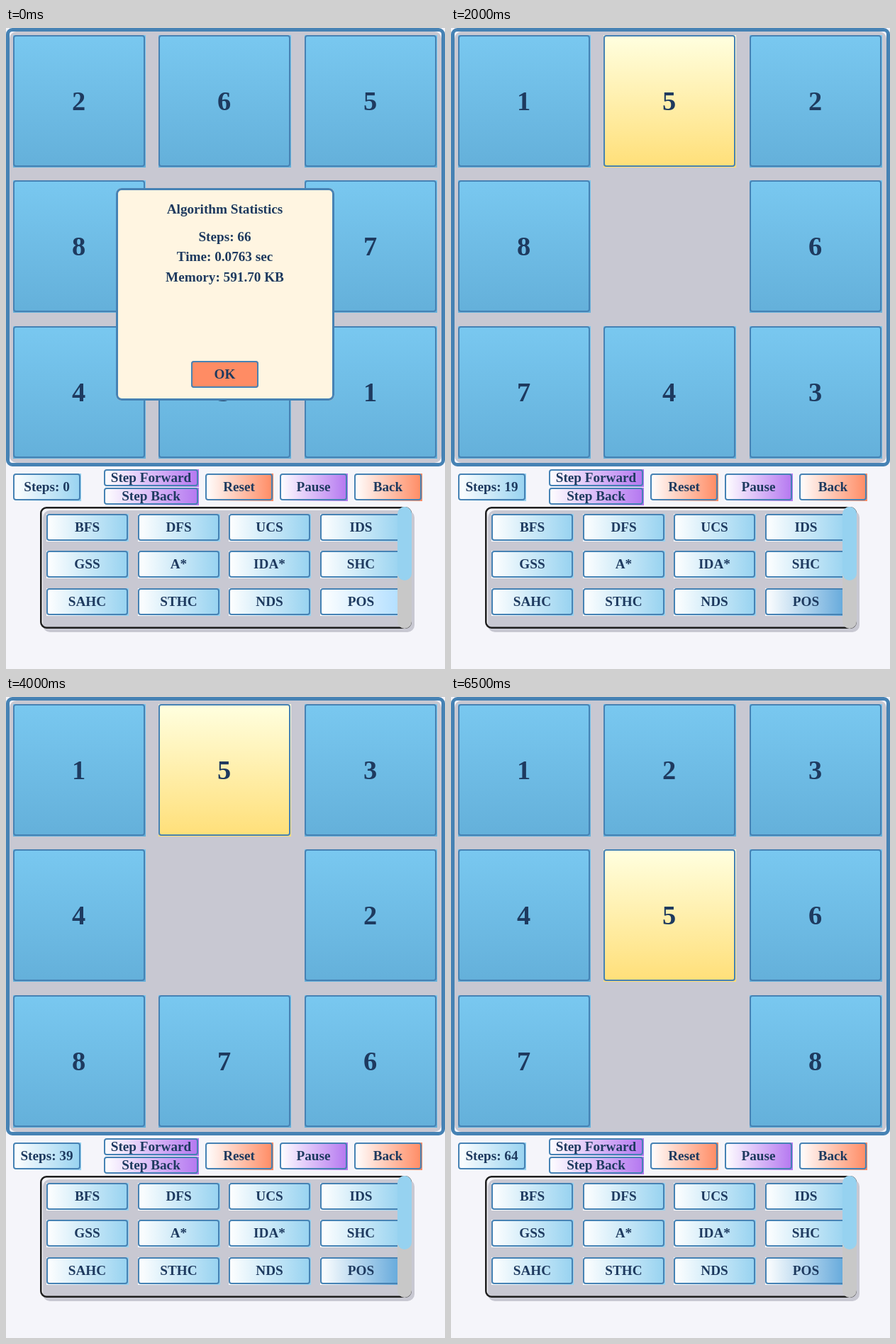
Recreate the animation shown at these times as an HTML page. Size 619 by 905 pixels, loop 6.6 s.

```html
<!DOCTYPE html>
<html lang="en">
<head>
<meta charset="utf-8">
<title>Sliding puzzle solver</title>
<style>
  html, body { margin: 0; width: 100%; height: 100%; overflow: hidden; background: #f5f5fa; }
  svg { display: block; }
  text {
    font: bold 19.2px "Liberation Serif", "Times New Roman", serif;
    fill: #1e3a5f; text-anchor: middle; white-space: pre;
  }
  .digit { font-size: 38.4px; }
</style>
</head>
<body>
<svg id="stage" width="619" height="905" viewBox="0 0 619 905">
  <defs>
    <clipPath id="list"><rect x="48" y="677" width="504" height="171"/></clipPath>
  </defs>
</svg>
<script>
const STEP = 100;
const START = "265807431";
// Cell of the gap after every move, cells numbered 0-8 by row.
const PATH = "45210345874" + "5214763014" + "76341258" + "745214785214" +
  "7634587634" + "763410367430147";
const EDGE = "#4682b4", GREY = "#c8c8d2";

const stage = document.getElementById("stage");
const defs = stage.querySelector("defs");

function add(parent, tag, attrs, content) {
  const el = document.createElementNS("http://www.w3.org/2000/svg", tag);
  for (const key in attrs) el.setAttribute(key, attrs[key]);
  if (content !== undefined) el.textContent = content;
  parent.appendChild(el);
  return el;
}

function gradient(id, from, to, vertical) {
  const g = add(defs, "linearGradient", { id, x2: vertical ? 0 : 1, y2: vertical ? 1 : 0 });
  add(g, "stop", { offset: 0, "stop-color": from });
  add(g, "stop", { offset: 1, "stop-color": to });
}

function box(parent, x, y, width, height, fill, rx = 0) {
  return add(parent, "rect", { x, y, width, height, fill, rx });
}

// Rounded outline drawn inside the given bounds.
function outline(parent, x, y, w, h, color, line, r) {
  const el = box(parent, x + line / 2, y + line / 2, w - line, h - line, "none", r - line / 2);
  el.setAttribute("stroke", color);
  el.setAttribute("stroke-width", line);
}

function label(parent, x, y, content, size = 19.2) {
  return add(parent, "text", { x, y: Math.round(y + size * 0.3375) }, content);
}

// Square fill under a rounded outline.
function button(parent, x, y, w, h, paint, content) {
  const fill = box(parent, x, y, w + 1, h + 1, `url(#${paint})`);
  outline(parent, x, y, w, h, EDGE, 2, 4);
  const text = label(parent, x + w / 2, y + h / 2, content);
  return { fill, text };
}

gradient("tile", "#79c8f0", "#64b0da", true);
gradient("moved", "#ffffe0", "#ffdf78", true);
gradient("blue", "#ffffff", "#96d2f0");
gradient("hover", "#ffffff", "#b0deff");
gradient("active", "#ffffff", "#5fa6da");
gradient("purple", "#ffffff", "#b476f0");
gradient("orange", "#ffffff", "#ff8a62");

// Board
box(stage, 5, 5, 609, 609, GREY, 10);
outline(stage, 0, 0, 619, 619, EDGE, 5, 9);
const tiles = [...START].map((_, i) => {
  const x = Math.round(9.7 + 205.67 * (i % 3));
  const y = Math.round(9.7 + 205.67 * Math.floor(i / 3));
  const g = add(stage, "g", {});
  const fill = box(g, x, y, 187, 187, "url(#tile)");
  outline(g, x, y, 186, 186, EDGE, 2, 4);
  const text = label(g, x + 92.5, y + 93.5, "", 38.4);
  text.setAttribute("class", "digit");
  return { g, fill, text };
});

// Controls
const counter = button(stage, 10, 629, 95, 38, "blue", "Steps: 0").text;
button(stage, 138, 623, 133, 24, "purple", "Step Forward");
button(stage, 138, 649, 133, 24, "purple", "Step Back");
button(stage, 281, 629, 95, 38, "orange", "Reset");
button(stage, 386, 629, 95, 38, "purple", "Pause");
button(stage, 491, 629, 95, 38, "orange", "Back");

// Algorithm list
box(stage, 52, 681, 524, 172, GREY, 10);
outline(stage, 48, 676, 524, 172, "#1e1e1e", 2.5, 9);
const list = add(stage, "g", { "clip-path": "url(#list)" });
const names = "BFS DFS UCS IDS GSS A* IDA* SHC SAHC STHC NDS POS".split(" ");
const entries = names.map((name, i) =>
  button(list, Math.round(57 + 128.6 * (i % 4)), Math.round(686 + 52.4 * Math.floor(i / 4)),
    115, 38, "blue", name));
const chosen = entries[names.length - 1].fill;
box(stage, 552, 676, 20, 172, "#c8c8c8", 10);
box(stage, 552, 676, 20, 104, "#96d2f0", 10);

// Statistics dialog
const dialog = add(stage, "g", {});
box(dialog, 155, 226, 308, 300, "#fff5e1", 8);
outline(dialog, 155, 226, 308, 300, EDGE, 3, 8);
label(dialog, 308.5, 256, "Algorithm Statistics");
["Steps: 66", "Time: 0.0763 sec", "Memory: 591.70 KB"].forEach((line, i) =>
  label(dialog, 308.5, 294.3 + 28.6 * i, line));
box(dialog, 261, 470, 95, 38, "#ff8c64", 4);
outline(dialog, 261, 470, 95, 38, EDGE, 2, 4);
label(dialog, 308.5, 489, "OK");

// Board after every move
const boards = [[...START]];
for (let k = 1; k < PATH.length; k++) {
  const next = boards[k - 1].slice();
  next[PATH[k - 1]] = next[PATH[k]];
  next[PATH[k]] = "0";
  boards.push(next);
}

function show(k) {
  tiles.forEach((tile, i) => {
    const digit = boards[k][i];
    tile.g.style.display = digit === "0" ? "none" : "";
    tile.text.textContent = digit;
    const moved = k > 0 && i === +PATH[k - 1];
    tile.fill.setAttribute("fill", moved ? "url(#moved)" : "url(#tile)");
  });
  counter.textContent = "Steps: " + Math.max(0, k - 1);
  dialog.style.display = k ? "none" : "";
  chosen.setAttribute("fill", k ? "url(#active)" : "url(#hover)");
}

const began = performance.now();
let shown = -1;
function tick() {
  const k = Math.floor((performance.now() - began) / STEP) % boards.length;
  if (k !== shown) show(shown = k);
  requestAnimationFrame(tick);
}
tick();
</script>
</body>
</html>
```
